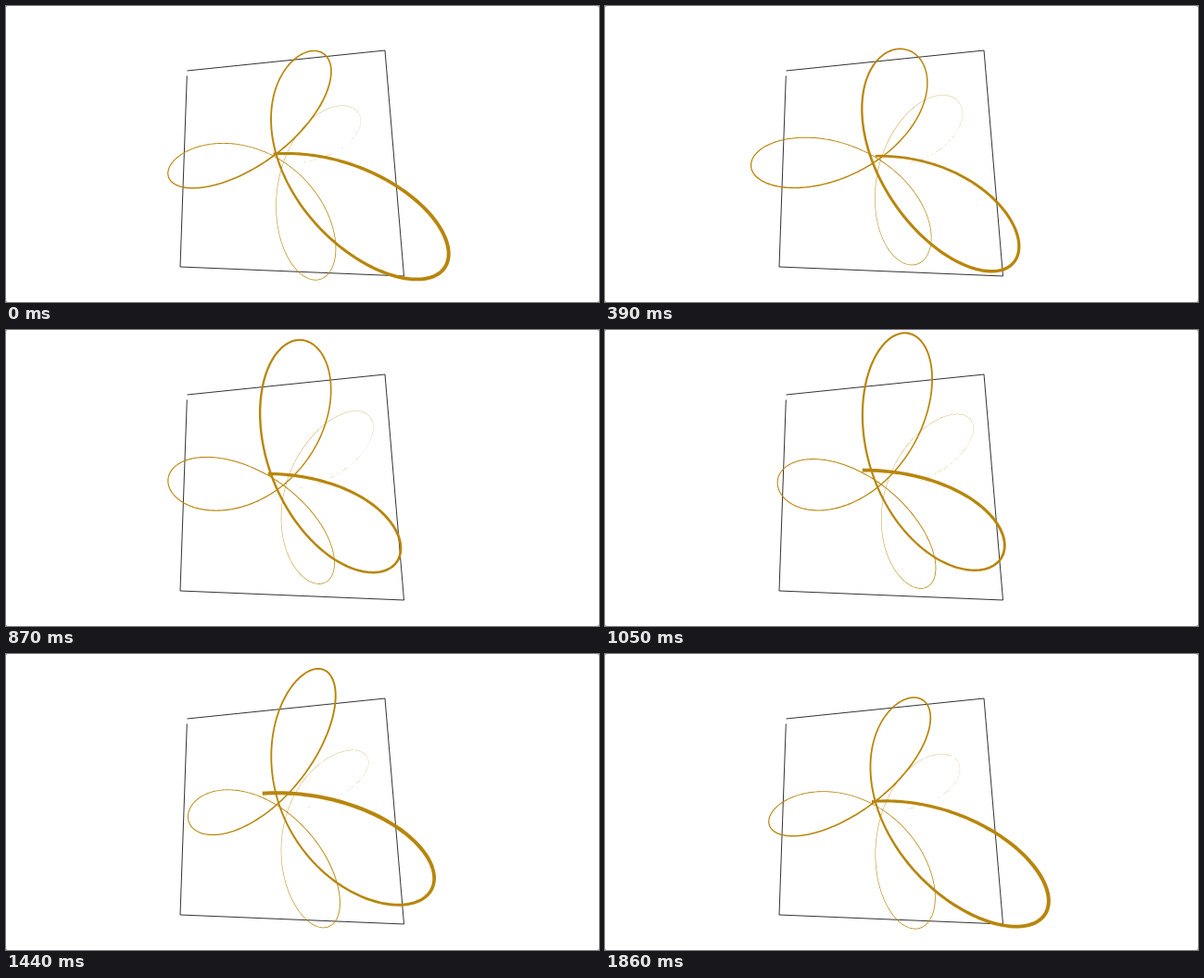
Write an HTML page that moves like this. It is 640x320 px and loops after 1890 ms.

```html
<!DOCTYPE html>
<html lang="en">
<head>
<meta charset="utf-8">
<title>Waving rose curve</title>
<style>
  html, body { margin: 0; width: 100%; height: 100%; overflow: hidden; background: #fff; }
  svg { display: block; width: 640px; height: 320px; }
</style>
</head>
<body>
<svg viewBox="0 0 640 320">
  <rect width="640" height="320" fill="#888"/>
  <rect width="640" height="320" rx="2" fill="#fff"/>
  <path d="M195.5 70L409 48L429.5 292L188 282L195.3 75.5" fill="none" stroke="#1c1c1c" stroke-width="0.9"/>
  <path id="rose" fill="#b8860b"/>
</svg>
<script>
const LOOP = 1890, STEP = 30, SAMPLES = 720, TAU = 2 * Math.PI;
const rose = document.getElementById('rose');

// Perspective view of the tilted plane; lift moves a point towards the eye.
function project(u, v, lift) {
  const depth = 1 - 0.0717 * u - 0.0592 * v - lift;
  return {
    x: 297.1 + (113 * u + 2.5 * v - 29 * lift) / depth,
    y: 166.5 + (113 * v - 3.95 * u - 22.5 * lift) / depth,
    depth
  };
}

// Half of the ten-petal rose, sinking along its length with a travelling wave.
function rosePoint(s, phase) {
  const angle = TAU * s;
  const radius = 1.1 * Math.sin(2.5 * angle);
  const lift = 0.295 - 0.56 * s + 0.14 * Math.cos(phase - 3.142 * angle + 2.073);
  const point = project(radius * Math.cos(angle), radius * Math.sin(angle), lift);
  point.width = 2.29 * (1 - s) / point.depth;
  return point;
}

function ribbon(phase) {
  const points = Array.from({ length: SAMPLES + 1 }, (_, i) => rosePoint(i / SAMPLES, phase));
  const left = [], right = [];
  points.forEach((p, i) => {
    const a = points[Math.max(i - 1, 0)], b = points[Math.min(i + 1, SAMPLES)];
    const k = p.width / 2 / Math.hypot(b.x - a.x, b.y - a.y);
    const nx = (a.y - b.y) * k, ny = (b.x - a.x) * k;
    left.push((p.x + nx).toFixed(2) + ' ' + (p.y + ny).toFixed(2));
    right.push((p.x - nx).toFixed(2) + ' ' + (p.y - ny).toFixed(2));
  });
  return 'M' + left.concat(right.reverse()).join('L') + 'Z';
}

function draw(ms) {
  const time = Math.floor((ms % LOOP) / STEP) * STEP;
  rose.setAttribute('d', ribbon(TAU * time / LOOP));
}

const start = performance.now();
function tick() {
  draw(performance.now() - start);
  requestAnimationFrame(tick);
}
tick();
</script>
</body>
</html>
```
